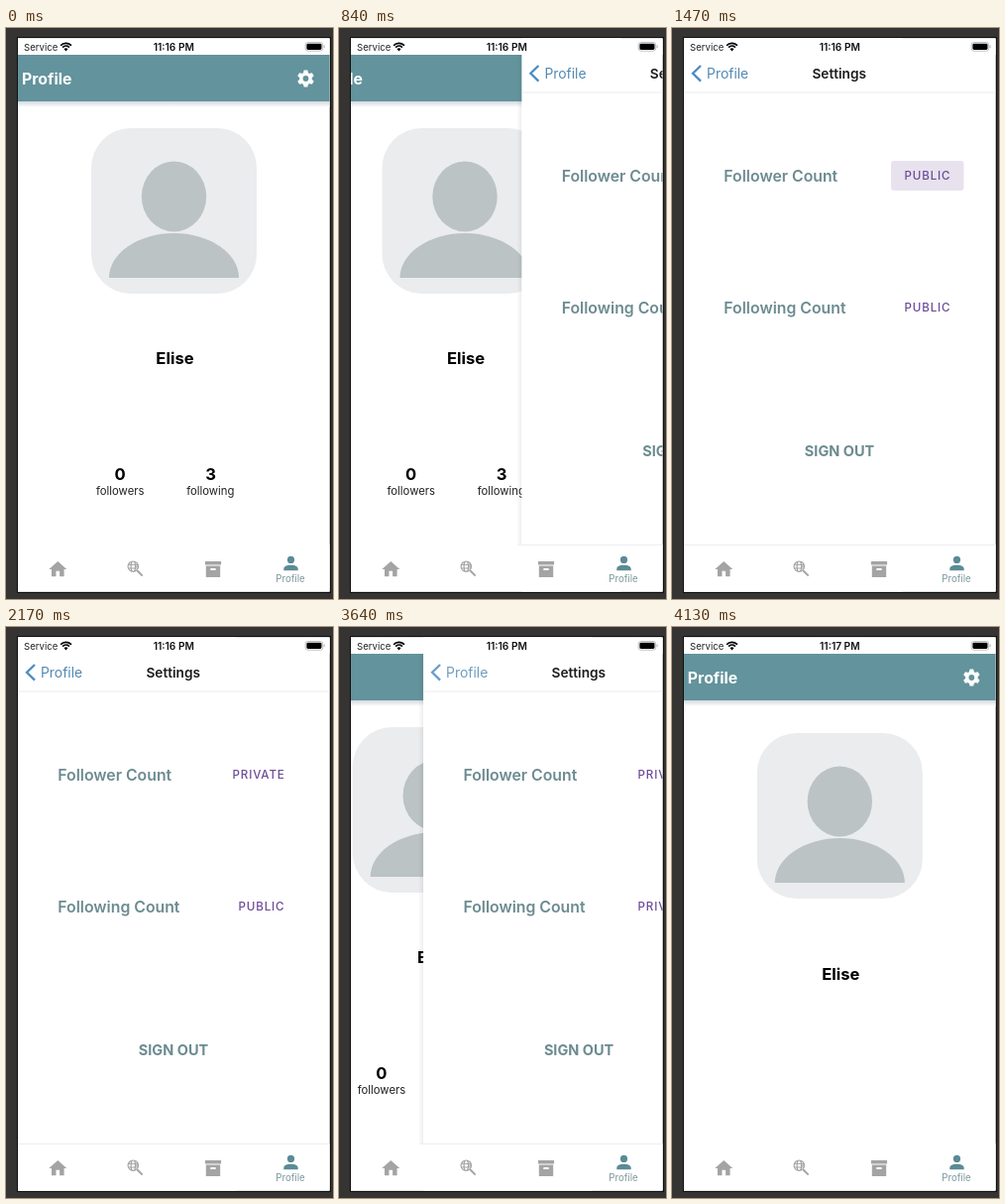
These frames come from a looping animation (330 px wide and 576 px high, 4760 ms). An HTML page with a canvas:

```html
<!DOCTYPE html>
<html lang="en">
<head>
<meta charset="utf-8">
<title>Profile settings</title>
<style>
html, body { margin: 0; width: 100%; height: 100%; overflow: hidden; background: #353432; }
canvas { display: block; width: 330px; height: 576px; }
</style>
</head>
<body>
<canvas id="stage"></canvas>
<script>
const LOOP = 4760, LEFT = 12, TOP = 10, WIDTH = 315, HEIGHT = 559, TRAVEL = 314;
const TEAL = '#63939c', SLATE = '#6c8b91', PURPLE = '#6d4b98', GREY = '#a4a4a4', BLUE = '#4a8cc3';
const canvas = document.getElementById('stage');
const ctx = canvas.getContext('2d');
const ratio = window.devicePixelRatio || 1;
canvas.width = 330 * ratio;
canvas.height = 576 * ratio;

const homeIcon = new Path2D('M10 20v-6h4v6h5v-8h3L12 3 2 12h3v8z');
const boxIcon = new Path2D('M3 3h18v4H3zM4 8h16v13H4zM9.5 11a.5.5 0 0 0-.5.5V13h6v-1.5a.5.5 0 0 0-.5-.5z');
const personIcon = new Path2D('M12 4a4 4 0 1 1 0 8 4 4 0 0 1 0-8M12 14c4.42 0 8 1.79 8 4v2H4v-2c0-2.21 3.58-4 8-4z');

const clamp = v => Math.max(0, Math.min(1, v));
const during = (t, from, to) => t >= from && t < to;

// Critically damped spring from 0 to 1
function spring(ms) {
  const x = Math.max(0, ms) * 0.0159;
  return 1 - (1 + x) * Math.exp(-x);
}

function rect(x, y, w, h, fill) {
  ctx.fillStyle = fill;
  ctx.fillRect(x, y, w, h);
}

function rounded(x, y, w, h, r, fill) {
  ctx.fillStyle = fill;
  ctx.beginPath();
  ctx.roundRect(x, y, w, h, r);
  ctx.fill();
}

function ellipse(x, y, rx, ry, fill, from = 0, to = Math.PI * 2) {
  ctx.fillStyle = fill;
  ctx.beginPath();
  ctx.ellipse(x, y, rx, ry, 0, from, to);
  ctx.fill();
}

// y is the baseline
function text(str, x, y, size, weight, color, align = 'left', spacing = 0) {
  ctx.font = `${weight} ${size}px Inter, "Liberation Sans", sans-serif`;
  ctx.letterSpacing = spacing + 'px';
  ctx.textAlign = align;
  ctx.fillStyle = color;
  ctx.fillText(str, x, y);
}

function line(points, width, color) {
  ctx.strokeStyle = color;
  ctx.lineWidth = width;
  ctx.beginPath();
  points.forEach(([x, y]) => ctx.lineTo(x, y));
  ctx.stroke();
}

function icon(path, x, y, color) {
  ctx.save();
  ctx.translate(x, y);
  ctx.scale(0.9, 0.9);
  ctx.translate(-12, -12);
  ctx.fillStyle = color;
  ctx.fill(path, 'evenodd');
  ctx.restore();
}

function gear(x, y) {
  ctx.save();
  ctx.translate(x, y);
  ctx.fillStyle = '#fff';
  ctx.beginPath();
  ctx.arc(0, 0, 6.3, 0, Math.PI * 2);
  ctx.arc(0, 0, 2.9, 0, Math.PI * 2, true);
  ctx.fill();
  for (let i = 0; i < 6; i++) {
    ctx.beginPath();
    ctx.moveTo(-2.6, -5.4);
    ctx.lineTo(-1.8, -8.4);
    ctx.lineTo(1.8, -8.4);
    ctx.lineTo(2.6, -5.4);
    ctx.fill();
    ctx.rotate(Math.PI / 3);
  }
  ctx.restore();
}

function globeSearch(x, y) {
  ctx.strokeStyle = GREY;
  ctx.lineWidth = 1.2;
  ctx.beginPath();
  ctx.arc(x, y, 5.2, 0, Math.PI * 2);
  ctx.ellipse(x, y, 2.2, 5.2, 0, 0, Math.PI * 2);
  ctx.stroke();
  line([[x - 5, y - 1.8], [x + 5, y - 1.8]], 1, GREY);
  line([[x - 5, y + 1.8], [x + 5, y + 1.8]], 1, GREY);
  line([[x + 4, y + 4], [x + 9.4, y + 9.4]], 2, GREY);
}

function profile(t) {
  const hidden = t >= 4120;
  const shift = hidden ? 6 : 0;
  rect(LEFT, TOP, WIDTH, HEIGHT, '#fff');
  const shade = ctx.createLinearGradient(0, 74, 0, 80);
  shade.addColorStop(0, '#d3d8df');
  shade.addColorStop(1, '#fff');
  rect(LEFT, 74, WIDTH, 6, shade);
  rect(LEFT, 27, WIDTH, 47, TEAL);
  text('Profile', 16, 56.5, 15.8, 700, '#fff');
  if (during(t, 560, 630)) ellipse(302, 51, 15, 15, 'rgba(255,255,255,.16)');
  gear(302.5, 51);

  rounded(86, 101 + shift, 167, 167, 40, '#eaecee');
  ellipse(169.5, 170 + shift, 32.7, 35.5, '#bbc3c4');
  ellipse(169.5, 252 + shift, 65.5, 45, '#bbc3c4', Math.PI, Math.PI * 2);
  text('Elise', 170.5, hidden ? 355.5 : 338.5, 16.6, 700, '#000', 'center');
  if (hidden) return;
  text('0', 115, 456, 16.6, 700, '#000', 'center');
  text('3', 206.5, 456, 16.6, 700, '#000', 'center');
  text('followers', 115.2, 471, 11.3, 400, '#222', 'center');
  text('following', 206.3, 471, 11.3, 400, '#222', 'center');
}

function privacyRow(label, y, isPrivate, pressed) {
  const x = isPrivate ? 228.5 : 234.5;
  text(label, 52.3, y + 5.8, 15.8, 600, SLATE);
  if (pressed) rounded(x - 13.5, y - 15, 294.5 - x + 13.5, 30, 3.3, 'rgba(109,75,152,.16)');
  text(isPrivate ? 'PRIVATE' : 'PUBLIC', x, y + 4.3, 11.6, 500, PURPLE, 'left', 0.84);
}

function settings(t) {
  const shade = ctx.createLinearGradient(LEFT - 5, 0, LEFT, 0);
  shade.addColorStop(0, 'rgba(0,0,0,0)');
  shade.addColorStop(1, 'rgba(0,0,0,.07)');
  rect(LEFT - 5, 27, 5, 541, shade);
  rect(LEFT, TOP, WIDTH, HEIGHT, '#fff');
  rect(LEFT, 64.5, WIDTH, 1, '#ececec');

  const dim = clamp((t - 3200) / 150) - clamp((t - 3400) / 300);
  ctx.globalAlpha = 1 - 0.8 * clamp(dim);
  line([[29, 38], [21, 45.8], [29, 53.6]], 2.3, BLUE);
  text('Profile', 35, 50.6, 13.9, 400, '#5289b3');
  ctx.globalAlpha = 1;

  text('Settings', 168.7, 50.6, 13.7, 600, '#1c1c1c', 'center');
  privacyRow('Follower Count', 149, t >= 1610, during(t, 1470, 1570));
  privacyRow('Following Count', 282, t >= 2590, during(t, 2450, 2550));
  text('SIGN OUT', 169, 432, 14.5, 700, SLATE, 'center');
}

function statusBar(t) {
  rect(LEFT, TOP, WIDTH, 17, '#fff');
  text('Service', 18, 22.7, 9.6, 400, '#222');
  ctx.strokeStyle = '#000';
  ctx.lineWidth = 1.7;
  for (const r of [4.6, 7.4]) {
    ctx.beginPath();
    ctx.arc(60.5, 22.8, r, -Math.PI * 0.76, -Math.PI * 0.24);
    ctx.stroke();
  }
  ctx.fillStyle = '#000';
  ctx.beginPath();
  ctx.moveTo(60.5, 23.6);
  ctx.arc(60.5, 23, 2.7, -Math.PI * 0.76, -Math.PI * 0.24);
  ctx.fill();
  text(t < 3850 ? '11:16 PM' : '11:17 PM', 169.3, 22.7, 10.2, 600, '#111', 'center');
  ctx.strokeStyle = '#b0b0b0';
  ctx.lineWidth = 0.8;
  ctx.beginPath();
  ctx.roundRect(302.2, 14.5, 17.5, 8.6, 2.4);
  ctx.stroke();
  rounded(303.4, 15.7, 15.1, 6.2, 1.4, '#000');
  rounded(320.6, 17.3, 1, 3, 0.5, '#b0b0b0');
}

function tabBar(edge) {
  rect(LEFT, 521, WIDTH, 48, '#fff');
  if (edge < LEFT + TRAVEL - 2) {
    const from = Math.max(LEFT, edge - 4);
    rect(from, 521, LEFT + WIDTH - from, 1, '#eeeeee');
  }
  icon(homeIcon, 52.3, 546, GREY);
  globeSearch(128.3, 543.2);
  icon(boxIcon, 209, 546, GREY);
  icon(personIcon, 287.5, 540, '#5b8b95');
  text('Profile', 287, 558.7, 9.7, 400, '#7d989e', 'center');
}

function draw(t) {
  ctx.setTransform(ratio, 0, 0, ratio, 0, 0);
  rect(0, 0, 330, 576, '#353432');
  rect(LEFT - 1, TOP - 1, WIDTH + 2, HEIGHT + 2, '#111');

  const shown = spring(t - 745) - spring(t - 3583.5);
  const offset = TRAVEL * (1 - shown);

  ctx.save();
  ctx.beginPath();
  ctx.rect(LEFT, TOP + 0.5, WIDTH - 0.5, HEIGHT - 1);
  ctx.clip();
  rect(LEFT, TOP, WIDTH, HEIGHT, '#fff');
  ctx.save();
  ctx.translate(-0.3 * TRAVEL * shown, 0);
  profile(t);
  ctx.restore();
  if (shown > 0.005) {
    ctx.save();
    ctx.translate(offset, 0);
    settings(t);
    ctx.restore();
  }
  tabBar(LEFT + offset);
  statusBar(t);
  ctx.restore();
}

const start = performance.now();
function tick() {
  draw((performance.now() - start) % LOOP);
  requestAnimationFrame(tick);
}
tick();
</script>
</body>
</html>
```
